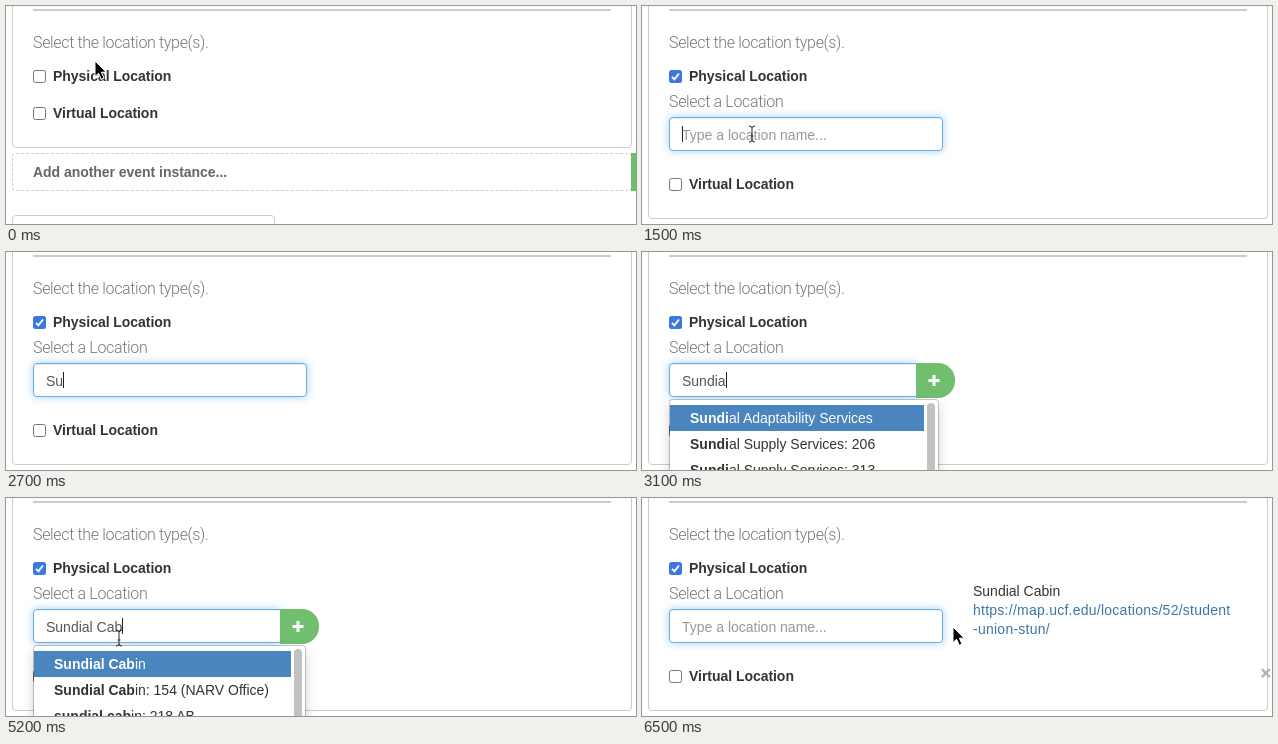
Animation, 630 px wide and 218 px high, one loop 6600 ms. Source, as an HTML page:

```html
<!DOCTYPE html>
<html lang="en">
<head>
<meta charset="utf-8">
<title>Location picker</title>
<style>
  html, body { margin: 0; width: 100%; height: 100%; overflow: hidden; background: #fff; }
  body { position: relative; font: 14px/20px "Liberation Sans", Arial, sans-serif; color: #333; }
  div, svg, b.t, span.t { position: absolute; box-sizing: border-box; white-space: pre; }
  svg { overflow: visible; }
  #stage { left: 0; top: 0; width: 630px; height: 218px; overflow: hidden; }
  .bold { font-weight: bold; letter-spacing: -.04px; }
  .light { font: 300 16px/20px Roboto, Inter, sans-serif; letter-spacing: -.34px; color: #777; }
  .rule { left: 27px; top: 3px; width: 578px; height: 2px; background: #ccc; }
  .panel { left: 6px; top: -20px; width: 620px; border: 1px solid #ccc; border-radius: 4px; }
  .add { left: 6px; top: 147px; width: 620px; height: 38px; border: 1px dashed #ccc; border-radius: 4px; }
  .green { left: 625px; top: 147px; width: 5px; height: 38px; background: #6fbf6f; }
  .next { left: 6px; top: 209px; width: 263px; height: 34px; border: 1px solid #ccc; border-radius: 4px; }
  .check { left: 27px; width: 13px; height: 13px; border: 1px solid #767676; border-radius: 2.5px; background: #fff; }
  .check.on { border: 0; background: #3b78e3; }
  .check.on.hover { background: #3464bd; }
  .check svg { left: 0; top: 0; display: none; }
  .check.on svg { display: block; }
  #field { left: 27px; top: 111px; width: 274px; height: 34px; border: 1px solid #ccc; border-radius: 4px;
    background: #fff; box-shadow: inset 0 1px 1px rgba(0,0,0,.075); padding: 7px 0 0 12px; color: #555; }
  #field.focus { border-color: #66afe9;
    box-shadow: inset 0 1px 1px rgba(0,0,0,.075), 0 0 8px rgba(102,175,233,.6); }
  #field.split { width: 248px; border-radius: 4px 0 0 4px; }
  #hint { left: 12px; top: 7px; color: #999; }
  #caret { top: 8px; width: 1px; height: 16px; background: #222; }
  #plus { left: 274px; top: 111px; width: 39px; height: 35px; border-radius: 0 17px 17px 0; background: #6fbf6f; }
  #menu { left: 27px; top: 147px; height: 160px; border: 1px solid rgba(0,0,0,.2); border-radius: 4px;
    background: #fff; background-clip: padding-box; box-shadow: 0 6px 12px rgba(0,0,0,.175); }
  .row { left: 0; height: 26px; padding: 3px 0 0 20px; }
  .row:first-child { background: #4a85bf; color: #fff; }
  .bar { top: 3px; right: 3px; width: 8px; height: 100px; border-radius: 4px; background: #c1c1c1; }
  .link { color: #3a77a8; letter-spacing: .25px; }
</style>
</head>
<body>
<div id="stage">
  <div class="rule"></div>
  <div class="panel" id="panel"></div>
  <div class="light" style="left:27px;top:27px">Select the location type(s).</div>
  <div class="check" id="physical" style="top:64px">
    <svg width="13" height="13"><path d="M3 6.8 5.4 9.3 10 3.5" fill="none" stroke="#fff" stroke-width="1.9"/></svg>
  </div>
  <div class="bold" style="left:47px;top:60px">Physical Location</div>

  <div id="picker" style="left:0;top:0">
    <div class="light" style="left:27px;top:86px">Select a Location</div>
    <div id="field"><div id="hint">Type a location name...</div><span id="typed"></span><div id="caret"></div></div>
    <div id="plus"><svg width="39" height="35"><path d="M18 12v11M12.5 17.5h11" stroke="#fff" stroke-width="3"/></svg></div>
  </div>

  <div id="lower" style="left:0;top:0">
    <div class="check" style="top:101px"></div>
    <div class="bold" style="left:47px;top:97px">Virtual Location</div>
    <div class="add"></div>
    <div class="bold" style="left:27px;top:156px;color:#666">Add another event instance...</div>
    <div class="green"></div>
    <div class="next"></div>
  </div>

  <div id="detail" style="left:0;top:0">
    <div style="left:331px;top:83px">Sundial Cabin</div>
    <div class="link" style="left:331px;top:102px">https://map.ucf.edu/locations/52/student</div>
    <div class="link" style="left:331px;top:121px">-union-stun/</div>
    <svg width="630" height="218"><path d="M603.8 91.2l8 8m0-8l-8 8" stroke="#b3b3b3" stroke-width="2.4"/></svg>
  </div>

  <div id="menu"></div>

  <svg id="arrow" width="12" height="20"><path d="M0 0V15.5L3.6 12.2 6.3 18.3 9 17.1 6.4 11.2H11.2Z" fill="#000" stroke="#fff" stroke-width="1"/></svg>
  <svg id="beam" width="8" height="16"><path d="M-3-8Q0-8 0-6V6Q0 8-3 8M3-8Q0-8 0-6M0 6Q0 8 3 8M-1.5 2h3" fill="none" stroke="#222"/></svg>
  <svg id="hand" width="16" height="18"><path d="M-1.5.8Q0-1 1.5.8V6Q3 4.8 4.3 6.2 5.8 5.2 7 6.8 9 6 9.6 8V11.5L8 16H0.2L-4.3 9.8Q-4.2 7.6-1.5 9.3Z" fill="#fff" stroke="#000" stroke-width="1.1"/><path d="M1.5 10.5v3M4 10.5v3M6.4 10.5v3" stroke="#000" stroke-width=".9"/></svg>
</div>

<script>
const LOOP = 6600, STEP = 100;
const $ = id => document.getElementById(id);
const NAME = "Sundial Cab";
const LISTS = [
  ["Sundial Adaptability Services", "Sundial Supply Services: 206", "Sundial Supply Services: 313"],
  ["Sundial Cabin", "Sundial Cabin: 154 (NARV Office)", "sundial cabin: 218 AB"]
];

const CHECKED = 500, FOCUS = 1500, OPEN = 2800, PICKED = 5900;

// time, letters typed
const KEYS = [[FOCUS, 0], [2500, 1], [2700, 2], [2800, 3], [2900, 4], [3000, 5], [3100, 6], [3200, 7],
  [3700, 8], [3900, 9], [4000, 10], [4200, 11], [PICKED, 0]];

// time, bold letters, list, right edge of the rows
const MENUS = [[OPEN, 2, 0, 525], [2900, 3, 0, 525], [3000, 4, 0, 282], [3100, 5, 0, 282], [3500, 7, 0, 282],
  [3900, 8, 1, 284], [4100, 10, 1, 284], [4600, 11, 1, 285]];

// time, x, y of the pointer
const PATH = [[0, 89, 55], [500, 37, 68], [900, 37, 68], [1500, 110, 128], [5100, 110, 128],
  [5400, 122, 174], [5700, 103, 166], [5800, 103, 166], [6500, 311, 129]];

const last = (table, t) => table.filter(r => r[0] <= t).pop();
const show = (id, on) => { $(id).style.display = on ? "" : "none"; };

function pointer(t) {
  const i = Math.max(0, PATH.findLastIndex(p => p[0] <= t));
  const a = PATH[i], b = PATH[i + 1] || a;
  const k = b === a ? 0 : (t - a[0]) / (b[0] - a[0]);
  const e = k * k * (3 - 2 * k);
  return [a[1] + (b[1] - a[1]) * e, a[2] + (b[2] - a[2]) * e];
}

function drawMenu(t) {
  const on = t >= OPEN && t < PICKED;
  show("menu", on);
  if (!on) return;
  const [, n, list, right] = last(MENUS, t);
  $("menu").style.width = right - 12 + "px";
  $("menu").innerHTML = LISTS[list].map((s, i) =>
    `<div class="row" style="top:${5 + 26 * i}px;width:${right - 28}px"><b>${s.slice(0, n)}</b>${s.slice(n)}</div>`
  ).join("") + '<div class="bar"></div>';
}

function drawField(t) {
  const [since, n] = last(KEYS, t) || [0, 0];
  const focus = t >= FOCUS, open = t >= OPEN && t < PICKED;
  $("field").className = (focus ? "focus" : "") + (open ? " split" : "");
  $("typed").textContent = NAME.slice(0, n);
  show("hint", !n);
  show("plus", open);
  show("caret", focus && Math.floor((t - since) / 500) % 2 === 0);
  $("caret").style.left = 12 + $("typed").offsetWidth + "px";
}

function drawPointer(t) {
  const [x, y] = pointer(t);
  const seen = t < 2500 || t >= 5200;
  const inField = t >= CHECKED && x > 27 && x < 301 && y > 111 && y < 146;
  const inMenu = t >= OPEN && t < PICKED && y >= 147;
  const kind = inMenu ? "hand" : inField ? "beam" : "arrow";
  for (const id of ["arrow", "beam", "hand"]) {
    show(id, seen && id === kind);
    $(id).style.left = Math.round(x) + "px";
    $(id).style.top = Math.round(y) + "px";
  }
}

function draw(now) {
  const t = Math.floor(now % LOOP / STEP) * STEP;
  const checked = t >= CHECKED;
  $("physical").className = "check" + (checked ? " on" : "") + (checked && t < 1100 ? " hover" : "");
  show("picker", checked);
  $("lower").style.top = checked ? "71px" : "0";
  $("panel").style.height = (checked ? 233 : 162) + "px";
  show("detail", t >= PICKED);
  drawField(t);
  drawMenu(t);
  drawPointer(t);
}

const start = performance.now();
function tick() {
  draw(performance.now() - start);
  requestAnimationFrame(tick);
}
tick();
</script>
</body>
</html>
```
